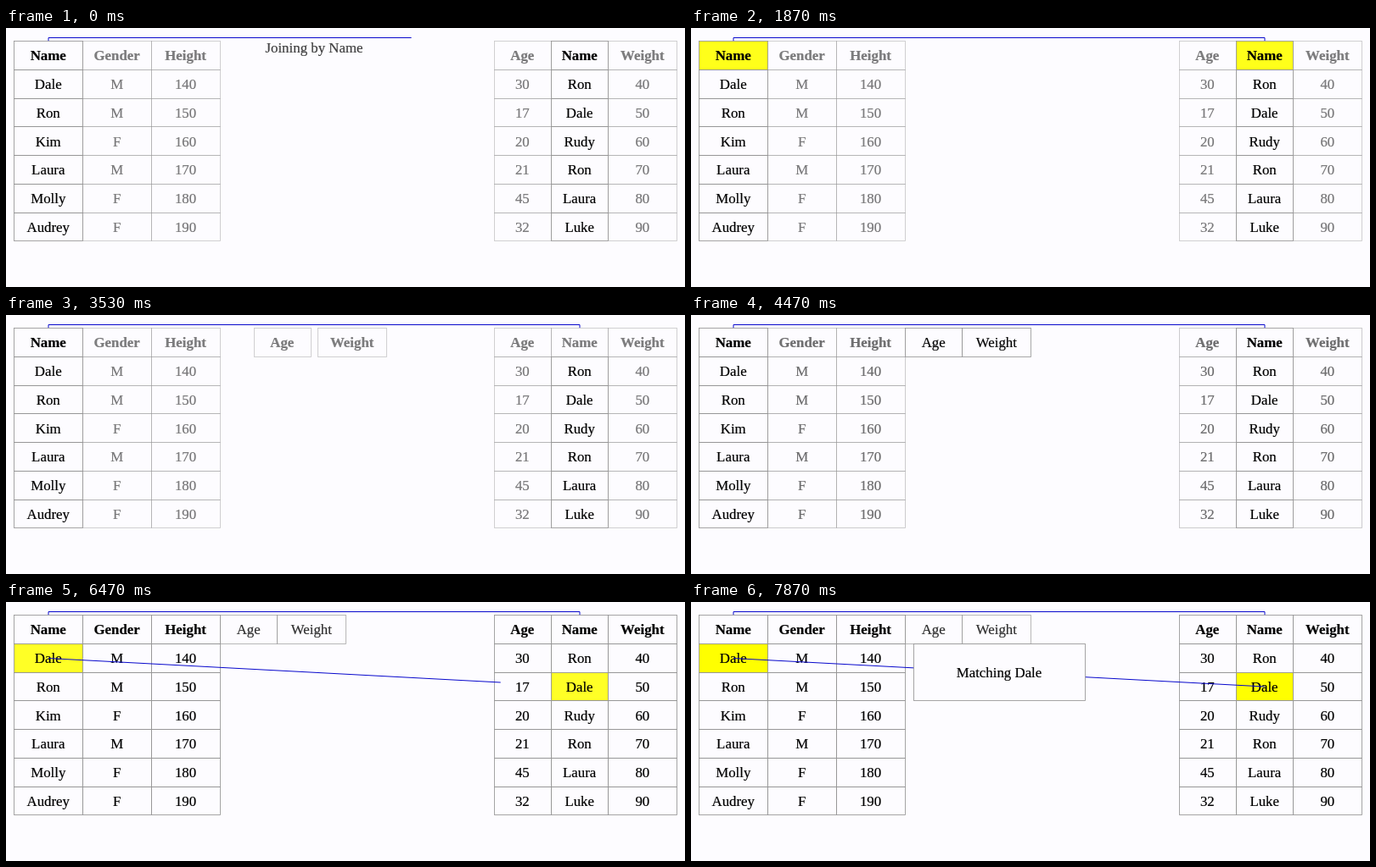
These frames come from a looping animation (800 px wide and 306 px high, 8 s). An HTML page with a canvas:

```html
<!DOCTYPE html>
<html lang="en">
<head>
<meta charset="utf-8">
<title>Joining by Name</title>
<style>
  html, body { margin: 0; width: 100%; height: 100%; overflow: hidden; background: #fdfcff; }
  canvas { display: block; }
</style>
</head>
<body>
<canvas id="stage" width="800" height="306"></canvas>
<script>
const ctx = document.getElementById('stage').getContext('2d');
const LOOP = 8000;
const PAPER = '#fdfcff', BORDER = '#969696', BLUE = '#0808cc';
const ROW = 33.75, TOP = 15.1, NARROW = 67.4, WIDE = 80.9;
const LEFT_X = 9.3, RIGHT_X = 574.6;
const SLOT_AGE = LEFT_X + 3 * WIDE, SLOT_WEIGHT = SLOT_AGE + NARROW;
const RIGHT_NAME = RIGHT_X + NARROW, RIGHT_WEIGHT = RIGHT_NAME + NARROW;
const KEY_LEFT = 50, KEY_RIGHT = 676, BRIDGE_Y = 11.5;

const column = (x, width, ...cells) => ({ x, width, cells, key: cells[0] === 'Name' });
const columns = [
  column(LEFT_X + WIDE, WIDE, 'Gender', 'M', 'M', 'F', 'M', 'F', 'F'),
  column(LEFT_X + 2 * WIDE, WIDE, 'Height', 140, 150, 160, 170, 180, 190),
  column(RIGHT_X, NARROW, 'Age', 30, 17, 20, 21, 45, 32),
  column(RIGHT_WEIGHT, WIDE, 'Weight', 40, 50, 60, 70, 80, 90),
  column(LEFT_X, WIDE, 'Name', 'Dale', 'Ron', 'Kim', 'Laura', 'Molly', 'Audrey'),
  column(RIGHT_NAME, NARROW, 'Name', 'Ron', 'Dale', 'Rudy', 'Ron', 'Laura', 'Luke')
];

// Linear progress from 0 to 1 between two times.
const ramp = (t, from, to) => Math.min(1, Math.max(0, (t - from) / (to - from)));
const cubicInOut = p => p < 0.5 ? 4 * p ** 3 : 1 - 4 * (1 - p) ** 3;
const mix = (a, b, p) => a + (b - a) * p;
const snap = v => Math.round(v) + 0.5;
const yellow = p => `rgb(255,255,${Math.round(255 * (1 - p))})`;

// The hairline outline thickens the serif face a little.
function label(text, x, y, bold) {
  ctx.font = `${bold ? 'bold ' : ''}16.85px "Liberation Serif", serif`;
  ctx.textAlign = 'center';
  ctx.fillStyle = ctx.strokeStyle = '#000';
  ctx.lineWidth = 0.2;
  ctx.fillText(text, x, y + 5.7);
  ctx.strokeText(text, x, y + 5.7);
}

function cell(text, x, y, w, h, { bold = false, fill = null, alpha = 1 } = {}) {
  const left = snap(x), top = snap(y);
  const width = snap(x + w) - left, height = snap(y + h) - top;
  ctx.globalAlpha = alpha;
  if (fill) {
    ctx.fillStyle = fill;
    ctx.fillRect(left, top, width, height);
  }
  ctx.strokeStyle = BORDER;
  ctx.lineWidth = 0.85;
  ctx.strokeRect(left, top, width, height);
  label(text, x + w / 2, y + h / 2 + 0.7, bold);
  ctx.globalAlpha = 1;
}

// Draws the first part of a polyline, measured along its length.
function trace(points, progress, width) {
  if (progress <= 0) return;
  const lengths = points.slice(1).map((p, i) => Math.hypot(p[0] - points[i][0], p[1] - points[i][1]));
  let rest = progress * lengths.reduce((a, b) => a + b);
  ctx.beginPath();
  ctx.moveTo(...points[0]);
  lengths.forEach((length, i) => {
    if (rest <= 0) return;
    const p = Math.min(1, rest / length), [a, b] = [points[i], points[i + 1]];
    ctx.lineTo(mix(a[0], b[0], p), mix(a[1], b[1], p));
    rest -= length;
  });
  ctx.strokeStyle = BLUE;
  ctx.lineWidth = width;
  ctx.stroke();
}

function draw(t) {
  ctx.fillStyle = PAPER;
  ctx.fillRect(0, 0, 800, 306);

  const headerGlow = t < 2130 ? ramp(t, 300, 2050) : 0;
  const matching = ramp(t, 5620, 6620);
  const restore = ramp(t, 4400, 5070);
  const moving = t >= 2157 && t < 4400;

  for (const { x, width, cells, key } of columns) {
    cells.forEach((text, row) => {
      const glow = !key ? 0 : row === 0 ? headerGlow : text === 'Dale' ? matching : 0;
      // The whole right-hand header is dimmed while its copies travel.
      const dimmed = !key || (moving && row === 0 && x === RIGHT_NAME);
      cell(text, x, TOP + row * ROW, width, ROW, {
        bold: row === 0,
        fill: glow ? yellow(glow) : null,
        alpha: dimmed ? mix(0.5, 1, restore) : 1
      });
    });
  }

  if (t >= 2157) {
    const arrived = t >= 4180;
    const p = cubicInOut(ramp(t, 2157, 4157));
    const style = { bold: !arrived, alpha: arrived ? mix(1, 0.8, restore) : 0.5 };
    cell('Age', mix(RIGHT_X, SLOT_AGE, p), TOP, NARROW, ROW, style);
    cell('Weight', mix(RIGHT_WEIGHT, SLOT_WEIGHT, p), TOP, WIDE, ROW, style);
  }

  const bridge = [[KEY_LEFT, TOP], [KEY_LEFT, BRIDGE_Y], [KEY_RIGHT, BRIDGE_Y], [KEY_RIGHT, TOP]];
  trace(bridge, ramp(t, -680, 320), 1);
  trace([[KEY_LEFT, 66.5], [KEY_RIGHT, 100]], matching, 1.2);

  ctx.globalAlpha = 0.73 * (1 - ramp(t, 0, 400));
  label('Joining by Name', 363, 22.8);
  ctx.globalAlpha = 1;

  const message = ramp(t, 6620, 7620);
  if (message) cell('Matching Dale', 262, TOP + ROW, 202, 2 * ROW, { fill: PAPER, alpha: message });
}

function tick() {
  draw(performance.now() % LOOP);
  requestAnimationFrame(tick);
}
tick();
</script>
</body>
</html>
```
